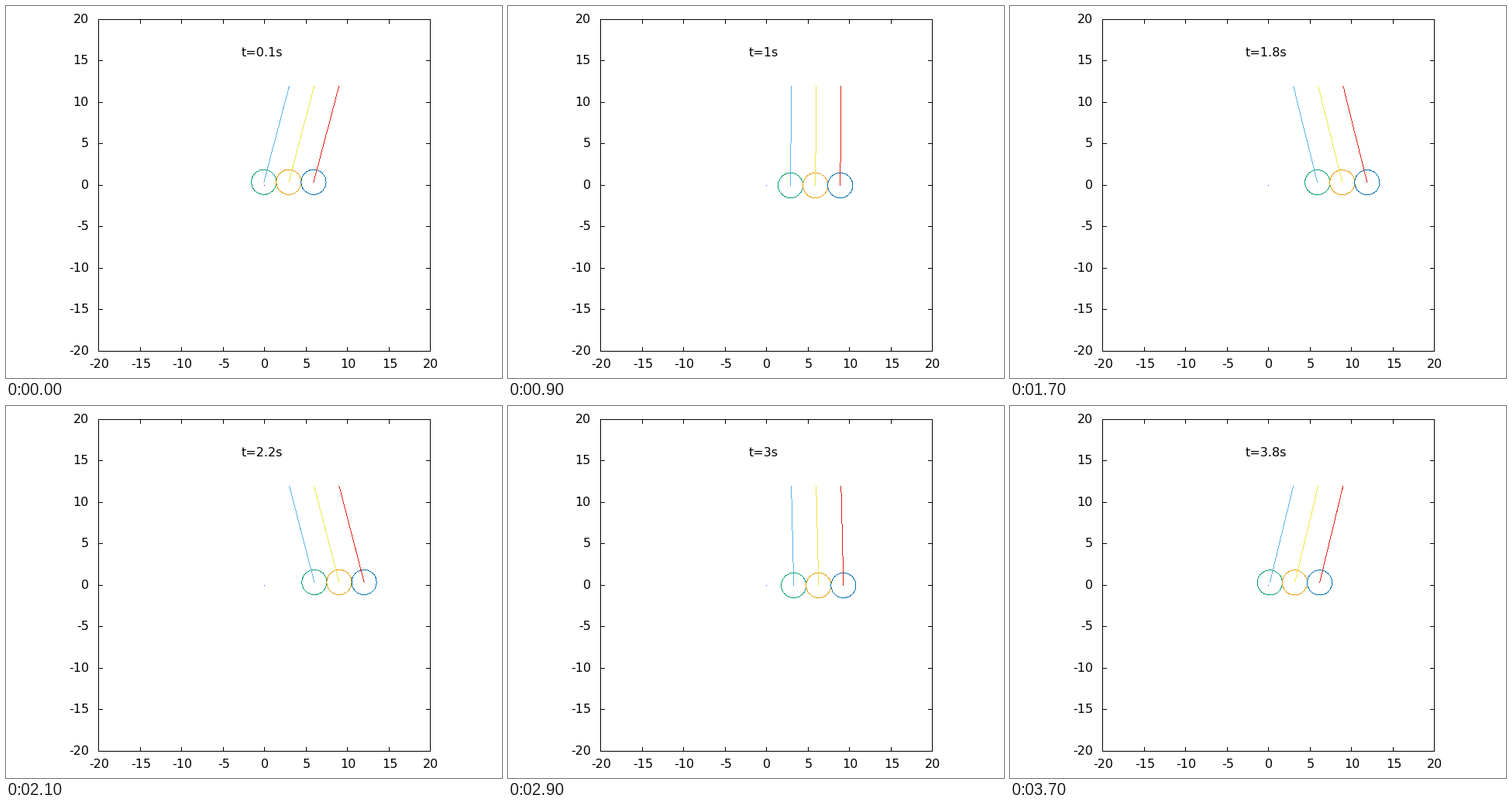
A matplotlib script that plays this animation: 640x480 px, repeating every 3800 ms.

```python
import numpy as np
import matplotlib.pyplot as plt
from matplotlib.animation import FuncAnimation
from matplotlib.colors import to_rgb

W, H, DPI = 640, 480, 100
LEFT, RIGHT, TOP, BOTTOM = 119, 547, 17, 445
SCALE = 10.7                 # pixels per unit
ORIGIN_X, ORIGIN_Y = 333, 231
TICK = 5

LENGTH, RADIUS = 12, 1.5
AMPLITUDE, OMEGA = np.pi / 12, 1.54
PENDULUMS = [                # pivot x, bob colour, string colour
    (3, "#009e73", "#56b4e9"),
    (6, "#e69f00", "#f0e442"),
    (9, "#0072b2", "#e51e10"),
]

plt.rcParams["font.family"] = "DejaVu Sans"
fig = plt.figure(figsize=(W / DPI, H / DPI), dpi=DPI, facecolor="white")


def rgb(color):
    return np.round(np.array(to_rgb(color)) * 255).astype(np.uint8)


def write(x, y, text, ha):
    return fig.text(x / W, 1 - y / H, text, ha=ha, va="baseline",
                    fontsize=16 * 72 / DPI, color="black")


def plot(canvas, x, y, color):
    """Set the pixels nearest to points given in data units."""
    cols = np.floor(ORIGIN_X + SCALE * np.asarray(x) + 0.5).astype(int)
    rows = ORIGIN_Y - np.floor(SCALE * np.asarray(y) + 0.5).astype(int)
    canvas[rows, cols] = rgb(color)


def draw_frame(canvas):
    canvas[[TOP, BOTTOM], LEFT:RIGHT + 1] = 0
    canvas[TOP:BOTTOM + 1, [LEFT, RIGHT]] = 0
    for value in range(-20, 21, 5):
        col = int(np.floor(ORIGIN_X + SCALE * value + 0.5))
        row = ORIGIN_Y - int(np.floor(SCALE * value + 0.5))
        canvas[TOP:TOP + TICK + 1, col] = 0
        canvas[BOTTOM - TICK:BOTTOM + 1, col] = 0
        canvas[row, LEFT:LEFT + TICK + 1] = 0
        canvas[row, RIGHT - TICK:RIGHT + 1] = 0
        write(col + 1, 467, str(value), "center")
        write(107, row + 5, str(value), "right")


background = np.full((H, W, 3), 255, np.uint8)
draw_frame(background)
plot(background, [0], [0], "#9400d3")

ax = fig.add_axes([0, 0, 1, 1])
ax.axis("off")
image = ax.imshow(background, aspect="auto", interpolation="nearest")
clock = write(330, 65, "", "center")

along = np.linspace(0, 1, 130)
around = np.linspace(0, 2 * np.pi, 110, endpoint=False)


def update(i):
    t = (i + 1) / 10
    theta = -AMPLITUDE * np.cos(OMEGA * t)
    dx, dy = LENGTH * np.sin(theta), -LENGTH * np.cos(theta)
    canvas = background.copy()
    for pivot, bob_color, string_color in PENDULUMS:
        x, y = pivot + dx, LENGTH + dy
        plot(canvas, x + RADIUS * np.cos(around),
             y + RADIUS * np.sin(around), bob_color)
        plot(canvas, pivot + dx * along, LENGTH + dy * along, string_color)
    image.set_data(canvas)
    clock.set_text(f"t={t:g}s")
    return image, clock


anim = FuncAnimation(fig, update, frames=38, interval=100,
                     repeat=True, repeat_delay=0)
plt.show()
```
